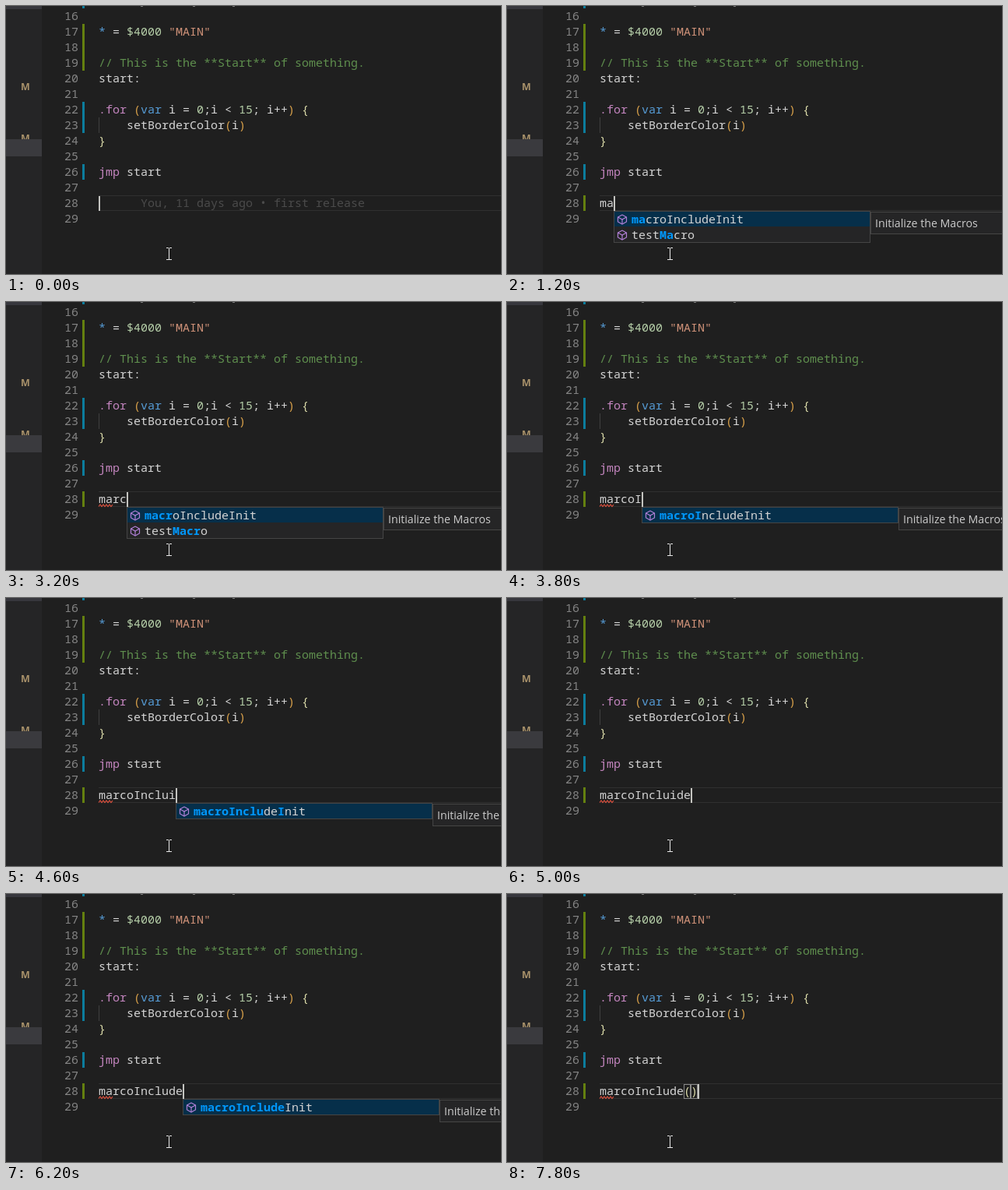
An HTML page with a canvas that plays this animation: 636x344 px, repeating every 8000 ms.

```html
<!DOCTYPE html>
<html lang="en">
<head>
<meta charset="utf-8">
<title>Code completion</title>
<style>
html, body { margin: 0; height: 100%; overflow: hidden; background: #1f1f1f; }
canvas { display: block; }
</style>
</head>
<body>
<canvas id="stage" width="636" height="344"></canvas>
<script>
const ctx = document.getElementById('stage').getContext('2d');
const LOOP = 8000, CHAR = 9, LEFT = 119, LINE = 20;
const MONO = '15px "Noto Sans Mono", monospace';
const C = {
  plain: '#d4d4d4', blue: '#569cd6', number: '#b5cea8', string: '#ce9178',
  comment: '#5f8f4e', keyword: '#c586c0', paren: '#d7a04a', brace: '#dcdcaa',
  added: '#64800f', changed: '#0c7d9d', panel: '#252526', border: '#454545'
};

// Line number -> [colour, text] runs
const code = {
  17: [['blue', '*'], ['plain', ' = '], ['number', '$4000 '], ['string', '"MAIN"']],
  19: [['comment', '// This is the **Start** of something.']],
  20: [['plain', 'start:']],
  22: [['keyword', '.for '], ['paren', '('], ['blue', 'var'], ['plain', ' i = '], ['number', '0'],
       ['plain', ';i < '], ['number', '15'], ['plain', '; i++'], ['paren', ')'], ['brace', ' {']],
  23: [['plain', '    setBorderColor'], ['paren', '('], ['plain', 'i'], ['paren', ')']],
  24: [['brace', '}']],
  26: [['keyword', 'jmp '], ['plain', 'start']]
};

// Brackets mark the matched letters of each suggestion
const macros = (...items) => ({ items, doc: 'Initialize the Macros' });
const lists = {
  ma: macros('[ma]croIncludeInit', 'test[Ma]cro'),
  mar: macros('[ma]c[r]oIncludeInit', 'test[Ma]c[r]o'),
  marc: macros('[macr]oIncludeInit', 'test[Macr]o'),
  marco: macros('[macro]IncludeInit', 'test[Macro]'),
  marcoI: macros('[macroI]ncludeInit'),
  marcoInc: macros('[macroInc]ludeInit'),
  marcoInclu: macros('[macroInclu]deInit'),
  marcoInclui: macros('[macroInclu]de[I]nit'),
  marcoInclud: macros('[macroInclud]eInit'),
  marcoInclude: macros('[macroInclude]Init'),
  opcodes: { items: ['[i]nc', '[i]nx', '[i]ny', 'macro[I]ncludeInit'], doc: 'INCrement memory', words: 3 }
};

// start time, text with | as caret, suggestion list
const steps = [
  [0, '|'], [200, ''], [600, '|'], [800, 'm|'],
  [1200, 'ma|', 'ma'], [1800, 'ma', 'ma'], [2200, 'ma|', 'ma'],
  [2800, 'mar|', 'mar'], [3000, 'marc|', 'marc'], [3400, 'marco|', 'marco'],
  [3800, 'marcoI|', 'marcoI'], [4200, 'marcoInc|', 'marcoInc'],
  [4400, 'marcoInclu|', 'marcoInclu'], [4600, 'marcoInclui|', 'marcoInclui'],
  [4800, 'marcoIncluid|'], [5000, 'marcoIncluide|'], [5400, 'marcoIncluid|'],
  [5600, 'marcoInclui|', 'opcodes'], [5800, 'marcoInclu|', 'marcoInclu'],
  [6000, 'marcoInclud|', 'marcoInclud'], [6200, 'marcoInclude|', 'marcoInclude'],
  [6600, 'marcoInclude|'], [6800, 'marcoInclude'], [7200, 'marcoInclude|'],
  [7400, 'marcoInclude(|)'], [7800, 'marcoInclude()|']
];

const lineTop = n => 3 + (n - 16) * LINE;
const baseline = n => lineTop(n) + 15;

function rect(x, y, w, h, color) {
  ctx.fillStyle = color;
  ctx.fillRect(x, y, w, h);
}
function outline(x, y, w, h, color) {
  ctx.strokeStyle = color;
  ctx.lineWidth = 1;
  ctx.strokeRect(x + .5, y + .5, w - 1, h - 1);
}
function write(str, x, y, color, font = MONO) {
  ctx.font = font;
  ctx.fillStyle = color;
  ctx.fillText(str, x, y);
}
function path(points, color, width = 1) {
  ctx.beginPath();
  points.forEach(([x, y]) => ctx.lineTo(x, y));
  ctx.strokeStyle = color;
  ctx.lineWidth = width;
  ctx.stroke();
}
function writeRuns(runs, x, y) {
  for (const [color, str] of runs) {
    write(str, x, y, C[color]);
    x += str.length * CHAR;
  }
}

function drawSidebar() {
  rect(0, 0, 46, 344, C.panel);
  rect(0, 0, 46, 4, '#37373d');
  const bold = 'bold 12.5px "Open Sans", sans-serif';
  write('M', 19, 108, '#a8916a', bold);
  write('M', 19, 174, '#a8916a', bold);
  rect(0, 171, 46, 22, '#3a3a3e');
}

function drawEditor() {
  rect(0, 0, 636, 344, '#1f1f1f');
  drawSidebar();
  rect(98, 0, 3, 3, C.changed);
  rect(98, lineTop(17), 3, 60, C.added);
  rect(98, lineTop(22), 3, 40, C.changed);
  rect(98, lineTop(26), 3, 20, C.changed);
  for (const x of [173, 240, 291]) rect(x, 0, 3, 1, '#777');
  for (let n = 16; n < 30; n++) write(n, 75, baseline(n), '#858585');
  rect(LEFT, lineTop(23), 1, LINE, '#404040');
  for (const n in code) writeRuns(code[n], LEFT, baseline(n));
  rect(LEFT, lineTop(28), 517, 1, '#303030');
  rect(LEFT, lineTop(28) + 19, 517, 1, '#303030');
}

function drawCube(x, y) {
  const color = '#b180d7';
  path([[x, y - 6], [x + 5.5, y - 3], [x + 5.5, y + 3], [x, y + 6],
        [x - 5.5, y + 3], [x - 5.5, y - 3], [x, y - 6]], color, 1.2);
  path([[x - 5.5, y - 3], [x, y], [x + 5.5, y - 3]], color, 1.2);
  path([[x, y], [x, y + 6]], color, 1.2);
}

function drawSuggestions({ items, doc, words = 0 }, x) {
  const y = 264, width = 330;
  rect(x, y, width, items.length * LINE - 1, C.panel);
  outline(x, y - 1, width, items.length * LINE + 1, C.border);
  rect(x + 1, y, width - 2, LINE - 1, '#062f4a');
  items.forEach((label, row) => {
    const base = y + row * LINE + 15;
    if (row < words) write('abc', x + 3, base - 2, '#c5c5c5', 'bold 9px "Open Sans", sans-serif');
    else drawCube(x + 11, base - 5);
    let partX = x + 23;
    label.split(/[\[\]]/).forEach((part, i) => {
      const matched = i % 2;
      write(part, partX, base, matched ? '#0097fb' : C.plain, matched ? 'bold ' + MONO : MONO);
      partX += part.length * CHAR;
    });
  });
  rect(x + width, y, 200, 29, C.panel);
  outline(x + width, y, 200, 29, C.border);
  write(doc, x + width + 6, y + 20, '#cccccc', '14.2px "Open Sans", sans-serif');
}

function drawSquiggle() {
  const points = Array.from({ length: 10 }, (_, i) => [LEFT + i * 2, i % 2 ? 260 : 262.5]);
  path(points, '#e0523f', 1.1);
}

function drawPointer() {
  rect(209, 311, 1, 15, '#e8e8e8');
  for (const y of [310, 325]) {
    rect(206, y, 3, 1, '#e8e8e8');
    rect(210, y, 3, 1, '#e8e8e8');
  }
}

function draw(t) {
  const [, typed, list] = steps.findLast(step => step[0] <= t);
  const caret = typed.indexOf('|');
  const line = typed.replace('|', '');
  const call = line.replace('()', '');
  const end = LEFT + line.length * CHAR;
  drawEditor();
  if (t < 800) {
    write('You, 11 days ago • first release', LEFT + 6 * CHAR, baseline(28), '#4b4b4b');
  } else {
    rect(98, lineTop(28), 3, LINE, C.added);
  }
  writeRuns([['plain', call], ['brace', line.slice(call.length)]], LEFT, baseline(28));
  if (call !== line) {
    for (const x of [end - 18, end - 9]) outline(x, lineTop(28) + 1, 9, 19, '#888888');
  }
  if (t >= 3200) drawSquiggle();
  if (caret >= 0) rect(LEFT + caret * CHAR, lineTop(28) + 1, 2, 19, '#c4c4c0');
  if (list) drawSuggestions(lists[list], end);
  drawPointer();
}

const startTime = performance.now();
function tick() {
  draw((performance.now() - startTime) % LOOP);
  requestAnimationFrame(tick);
}
tick();
</script>
</body>
</html>
```
